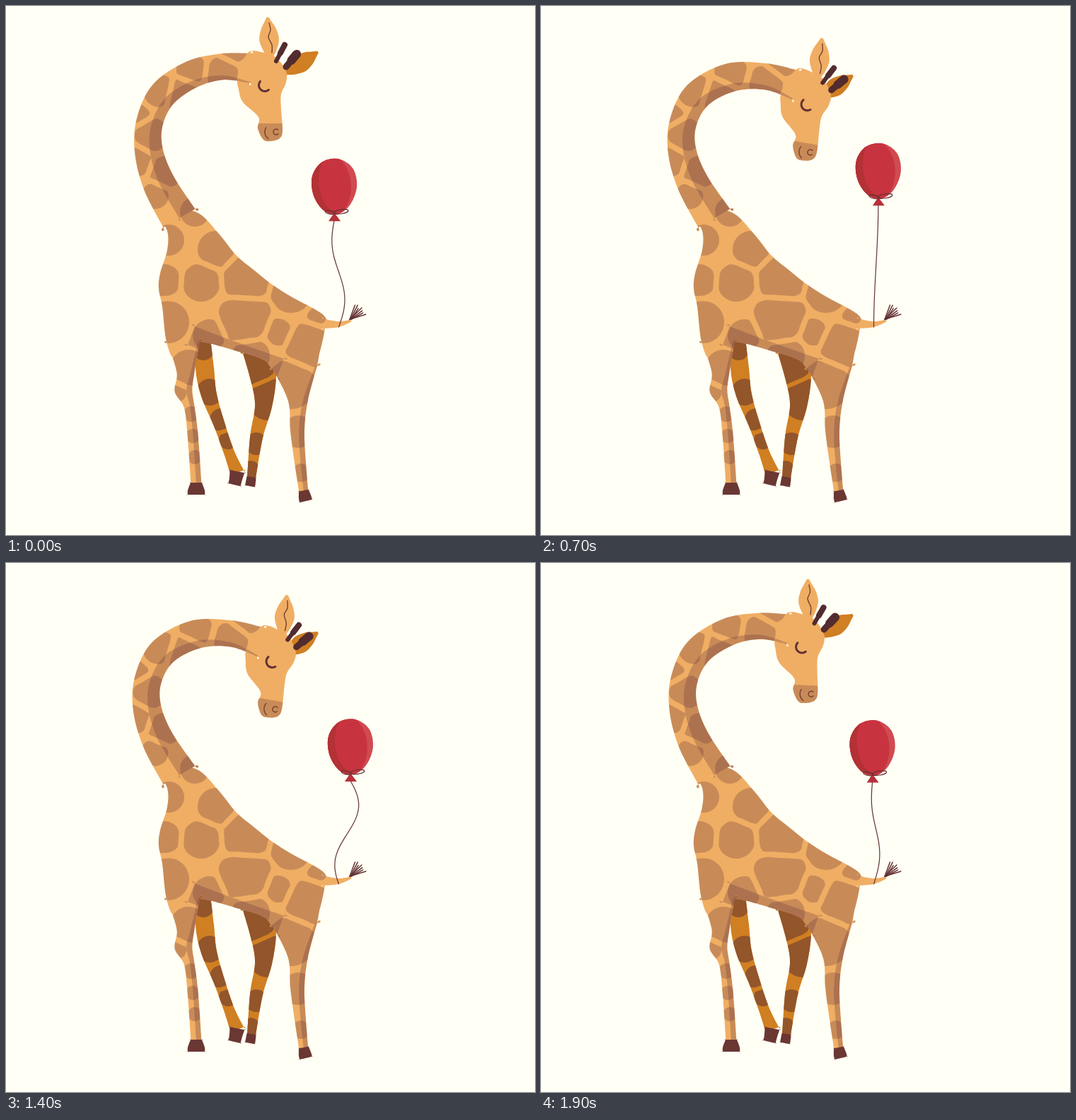
Animation of 748x748 px, one loop 2000 ms. Source, as an HTML page with a canvas:

```html
<!DOCTYPE html>
<html lang="en">
<head>
<meta charset="utf-8">
<title>Giraffe with balloon</title>
<style>
html, body { margin: 0; height: 100%; overflow: hidden; background: #fffff5; }
canvas { display: block; width: 100vw; height: 100vh; }
</style>
</head>
<body>
<canvas id="stage" width="748" height="748"></canvas>
<script>
const ctx = document.getElementById('stage').getContext('2d');
const { PI, sin, cos, min, max, hypot } = Math;
const TAN = '#f0ae64', ORANGE = '#d07f22', BROWN = '#93552a', HOOF = '#6a3733',
      HORN = '#522c2e', INK = '#633234', SHADE = 'rgba(107,57,60,.3)';

// Limbs: spine points as [x, y, half width].
const neck = [[345,88,21], [305,86,18.5], [262,97,19.5], [222,125,20], [203,165,19], [202,205,20], [216,250,23], [245,300,26]];
const tail = [[448,449,7], [470,450,4], [488,445,1.5]];
const frontLeg = { spine: [[251,475,23], [254,518,12.5], [251,544,12.5], [259,566,7.5], [264,605,7.5], [269,676,7.5]], hoof: [0,15,12] };
const rearLeg = { spine: [[409,512,31], [413,558,14], [412,600,10], [416,645,8], [421,687,6.5]], hoof: [3,13,9] };
const farLegs = [
  { spine: [[280,470,9], [281,512,13], [287,550,11], [301,590,8], [315,630,7.5], [327,660,10]], hoof: [-4,17,9],
    seeds: [[279,486,15], [288,546,19], [304,585,16], [314,614,13]] },
  { spine: [[358,488,23], [364,528,18], [364,566,12], [354,610,9], [347,668,6]], hoof: [-2,11,7],
    seeds: [[352,511,27], [371,556,30], [354,619,16], [346,656,13]] }];

const torso = [[214,285], [228,318], [228,345], [218,378], [216,400], [221,425], [227,475], [240,500], [268,488],
  [275,475], [330,489], [365,501], [385,520], [432,520], [444,488], [451,456], [452,441], [437,429], [405,412],
  [375,393], [350,373], [325,352], [300,321], [268,291]];
const head = [[328,101], [329,118], [335,136], [357,157], [356,173], [364,189], [375,191], [387,187], [391,176],
  [389,145], [389,125], [396,108], [396,92], [382,73], [365,66], [342,66]];

// Coat: spot centres with reach; the spots grow until they nearly meet.
const neckSeeds = [[322,60,20], [262,89,21], [305,95,23], [217,120,23], [248,127,27], [189,153,14], [206,182,24],
  [185,220,21], [226,235,23], [211,268,19], [267,291,21]];
const bodySeeds = [[230,331,22], [297,344,26], [224,388,23], [276,391,27], [341,387,34], [229,447,30], [338,443,39],
  [403,404,30], [440,437,14], [385,461,19], [426,480,32], [287,466,23], [346,495,27], [403,535,35]];
const legSeeds = [[258,512,26], [242,547,13], [262,577,11], [264,608,10], [267,638,10], [413,602,23], [417,660,13]];
const spots = [neckSeeds, bodySeeds, legSeeds].flatMap(seeds => grow(seeds));

function grow(seeds, gap = 4, corners = 20) {
  return seeds.map(([x, y, reach]) => Array.from({ length: corners }, (_, i) => {
    const a = i / corners * 2 * PI;
    let radius = reach;
    for (const [ox, oy, other] of seeds) {
      const gapless = hypot(ox - x, oy - y), facing = ((ox - x) * cos(a) + (oy - y) * sin(a)) / (gapless || 1);
      if (facing > 0) radius = min(radius, (gapless * reach / (reach + other) - gap) / facing);
    }
    return [x + radius * cos(a), y + radius * sin(a)];
  }));
}

const smooth = v => { v = min(1, max(0, v)); return v * v * (3 - 2 * v); };
const still = (x, y) => [x, y];
const arc = (x, y, r, from, to) => Array.from({ length: 9 }, (_, i) => {
  const a = (from + (to - from) * i / 8) * PI / 180;
  return [x + r * cos(a), y + r * sin(a)];
});

// Outline of a tapered limb, or of the strip between two fractions of its width.
function limb(spine, from = () => 1, to = () => -1) {
  const last = spine.length - 1;
  const side = edge => spine.map(([x, y, w], i) => {
    const a = spine[max(i - 1, 0)], b = spine[min(i + 1, last)];
    const dx = b[0] - a[0], dy = b[1] - a[1], s = w * edge(i / last) / hypot(dx, dy);
    return [x - dy * s, y + dx * s];
  });
  const doubleEnds = p => [p[0], ...p, p[last]];
  return [...doubleEnds(side(from)), ...doubleEnds(side(to).reverse())];
}
const shadedEdge = spine => limb(spine, t => -.9 * (1 - t) ** 2);

// Ear shape between a base and a tip.
function leaf(x, y, tipX, tipY, width) {
  const spine = [0, .2, .45, .7, .88, 1].map(t =>
    [x + (tipX - x) * t, y + (tipY - y) * t, width * sin(PI * (.1 + .84 * t)) ** 1.3]);
  return limb(spine);
}

// Bends the neck progressively and nods the head about a point on the neck.
function bend(step) {
  return (x, y) => {
    const weight = smooth((x - 190) / 155) * (x > 300 ? +(y < 240) : 1 - smooth((y - 150) / 80));
    const angle = weight * step * 1.25 * PI / 180;
    const sway = -.3 * step * (1 - weight) * smooth((y - 90) / 80) * (1 - smooth((y - 210) / 90));
    const dx = x - 216, dy = y - 186;
    return [216 + dx * cos(angle) - dy * sin(angle) + sway, 186 + dx * sin(angle) + dy * cos(angle)];
  };
}

// Smooth curve through all points.
function trace(points, map = still, closed = true) {
  const pts = points.map(([x, y]) => map(x, y)), n = pts.length;
  const at = i => closed ? pts[(i + n) % n] : pts[min(n - 1, max(0, i))];
  const path = new Path2D();
  path.moveTo(...pts[0]);
  for (let i = 0; i < (closed ? n : n - 1); i++) {
    const [a, b, c, d] = [at(i - 1), at(i), at(i + 1), at(i + 2)];
    path.bezierCurveTo(b[0] + (c[0] - a[0]) / 6, b[1] + (c[1] - a[1]) / 6,
      c[0] - (d[0] - b[0]) / 6, c[1] - (d[1] - b[1]) / 6, c[0], c[1]);
  }
  return path;
}

function paint(path, color, rule = 'nonzero') {
  ctx.fillStyle = color;
  ctx.fill(path, rule);
}
const fill = (points, color, map) => paint(trace(points, map), color);

function line(points, width, color = INK, map = still) {
  ctx.strokeStyle = color;
  ctx.lineWidth = width;
  ctx.stroke(trace(points, map, false));
}

function within(path, draw) {
  ctx.save();
  ctx.clip(path);
  draw();
  ctx.restore();
}

function ellipse(x, y, rx, ry, tilt = 0) {
  const path = new Path2D();
  path.ellipse(x, y, rx, ry, tilt, 0, 2 * PI);
  return path;
}

function drawHoof({ spine, hoof: [dx, dy, width] }) {
  const [x, y, w] = spine[spine.length - 1];
  fill(limb([[x, y - 2, w + .5], [x + dx * .6, y + dy * .6, width], [x + dx, y + dy, width]]), HOOF);
}

function drawHorn(x, y, tipX, tipY, width, pose) {
  line([[x, y], [tipX, tipY]], width, HORN, pose);
  line([[(x + tipX) / 2, (y + tipY) / 2], [tipX, tipY]], width * 1.35, HORN, pose);
}

function drawFace(pose) {
  const detail = '#75402f';
  drawHorn(382, 78, 394, 55, 6, pose);
  drawHorn(396, 86, 411, 68, 9, pose);
  line(arc(366, 112, 8.5, 50, 220), 3, INK, pose);
  line(arc(378, 178, 12, 125, 210), 1.4, detail, pose);
  line(arc(382, 178, 4, 40, 310), 1.4, detail, pose);
  line([[372,24], [374,34], [371,44], [376,55], [376,66]], 1.4, detail, pose);
}

function drawTuft() {
  for (let i = 0; i < 7; i++) {
    const a = (-72 + 9 * i) * PI / 180, length = 21 + 2 * sin(i * 2.4);
    line([[486 + i % 3, 443], [487 + length * cos(a), 443 + length * sin(a)]], 1.5);
  }
}

function drawGiraffe(step) {
  const pose = bend(step);
  for (const leg of farLegs) {
    const shape = trace(limb(leg.spine));
    paint(shape, ORANGE);
    within(shape, () => grow(leg.seeds, 3).forEach(s => fill(s, BROWN)));
  }
  fill(leaf(396, 95, 441, 65, 13), ORANGE, (x, y) => [x, y + 4.15 * step]);
  fill(leaf(374, 74, 370, 16, 14), TAN, pose);

  const body = new Path2D();
  for (const part of [torso, head, ...[neck, tail, frontLeg.spine, rearLeg.spine].map(s => limb(s))])
    body.addPath(trace(part, pose));
  paint(body, TAN);
  const belly = limb([[262,466,14], [320,488,14], [388,512,14]]);
  const muzzle = limb([[374,166,20], [374,180,20], [374,196,20]]);
  const shadows = [belly, ...[neck, frontLeg.spine, rearLeg.spine].map(shadedEdge)];
  within(body, () => [...spots, muzzle, ...shadows].forEach(s => fill(s, SHADE, pose)));

  drawFace(pose);
  [...farLegs, frontLeg, rearLeg].forEach(drawHoof);
  drawTuft();
}

// The slacker the string, the more it snakes.
function drawString(x, y) {
  const slack = max(0, (y - 196) / 30), swing = (x - 474) / 13;
  line(Array.from({ length: 13 }, (_, i) => {
    const u = i / 12;
    const wave = slack * (13 * swing * sin(2 * PI * u) + 6 * sin(PI * u));
    return [x + (470.5 - x) * smooth(u) + wave, y + 87 + (367 - y) * u];
  }), 1.2);
}

function drawBalloon(phase) {
  const a = (phase - 2) * PI / 12;
  const x = 476 - 13.2 * cos(a) + .9 * sin(a);
  const y = 210.5 - 16.2 * sin(a) - cos(a) + 1.7 * sin(2 * a);
  drawString(x, y);
  ctx.save();
  ctx.translate(x, y);
  const bulb = trace(arc(0, 0, 1, 0, 320), (c, s) => [32 * c * (1 - .12 * s), 39 + 39.5 * s]);
  paint(bulb, '#d04b51');
  within(bulb, () => {
    paint(ellipse(-16, 40, 40, 50), '#c7343f');
    const leftShade = ellipse(18, 30, 40, 52);
    leftShade.rect(-50, -30, 120, 130);
    paint(leftShade, '#b43136', 'evenodd');
  });
  paint(new Path2D('M0 76L9 88H-8Z'), '#b7303a');
  ctx.lineWidth = 1.2;
  ctx.strokeStyle = INK;
  ctx.stroke(ellipse(-6, 75.5, 7, 2.5, .2));
  ctx.stroke(ellipse(10, 74.5, 10, 3, -.15));
  ctx.restore();
}

function render(now) {
  const tick = Math.floor(now % 2000 / 100);
  const phase = Math.floor((tick * 12 + .5) / 10);
  paint(new Path2D('M0 0H748V748H0Z'), '#fffff5');
  ctx.lineCap = ctx.lineJoin = 'round';
  drawGiraffe(12 - Math.abs(12 - phase));
  drawBalloon(phase);
  requestAnimationFrame(render);
}
render(performance.now());
</script>
</body>
</html>
```
